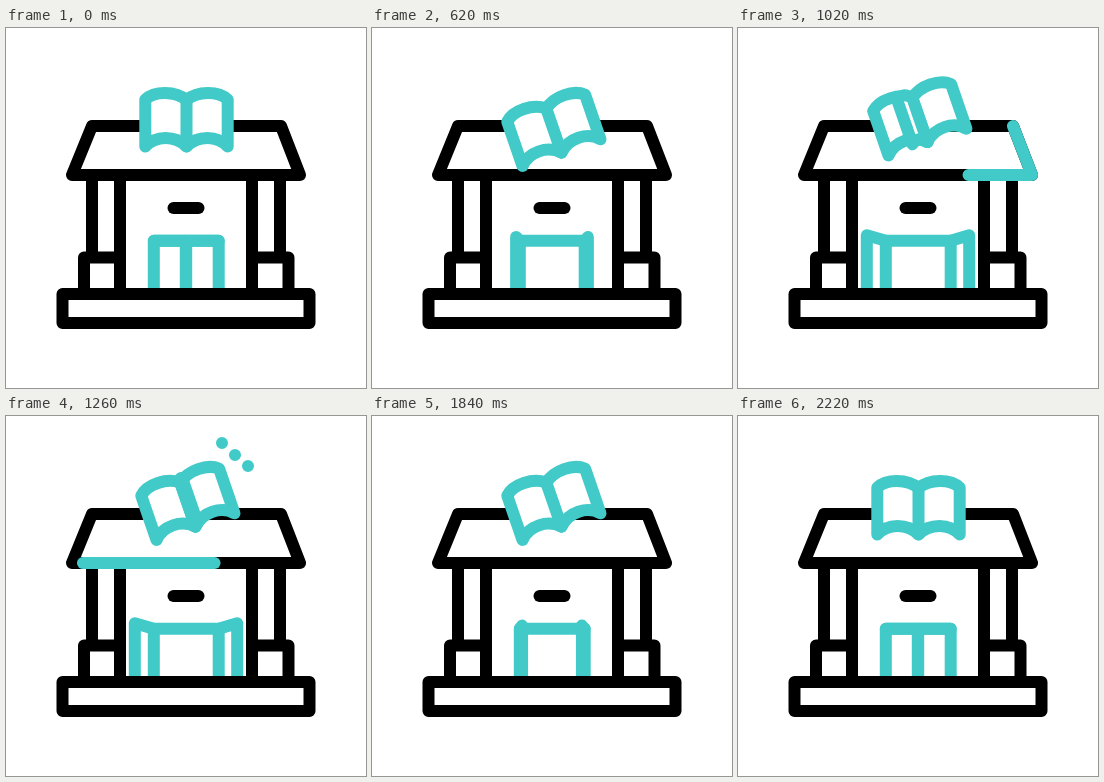
Animation of 360 by 360 pixels, one loop 2400 ms. Source, as an HTML page:

```html
<!DOCTYPE html>
<html>
<head>
<meta charset="utf-8">
<style>
html, body { margin: 0; width: 100%; height: 100%; overflow: hidden; background: #fff; }
svg { display: block; width: 100vw; height: 100vh; }
path { fill: none; stroke: #000; stroke-width: 12; stroke-linecap: round; stroke-linejoin: round; }
.teal { stroke: #41cac8; }
.page { fill: #fff; }
</style>
</head>
<body>
<svg viewBox="0 0 360 360">
  <path class="teal" d="M147.8 266V212.800H212.700V266"/>
  <path class="teal" id="doors"/>
  <path d="M86 147V229M114 147V266M78 266V229.500H114M246 147V266M274 147V229M246 229.500H282.500V266"/>
  <path d="M167.500 180H192.500"/>
  <path d="M56.500 266H303.500V295H56.500Z"/>
  <path d="M86 98H275L294 147H66Z"/>
  <path class="teal" id="glow"/>
  <g id="book">
    <path class="teal page" d="M-41.200 -22.500C-32 -31.300 -11 -31.300 0 -22C11 -31.300 32 -31.300 41.200 -22.500V24.500C31 13 11 13 0 24.500C-11 13 -31 13 -41.200 24.500Z"/>
    <path class="teal" d="M0 -22V24.500"/>
    <path class="teal page" id="leaf"/>
  </g>
  <path class="teal" id="rays"/>
</svg>
<script>
const LOOP = 2400;
const $ = id => document.getElementById(id);
const [doors, glow, book, leaf, rays] = ['doors', 'glow', 'book', 'leaf', 'rays'].map($);

const ramp = (t, a, b) => Math.min(1, Math.max(0, (t - a) / (b - a)));
const ease = (t, a, b) => { const u = ramp(t, a, b); return u * u * (3 - 2 * u); };
const mix = (a, b, u) => a + (b - a) * u;
const point = (x, y) => x.toFixed(2) + ' ' + y.toFixed(2);

const ROOF = [[86, 98], [275, 98], [294, 147], [66, 147]];
const SIDES = ROOF.map((p, i) => {
  const q = ROOF[(i + 1) % 4];
  return Math.hypot(q[0] - p[0], q[1] - p[1]);
});
const RAYS = [[216, 27, 214, 12.5], [229, 39, 239, 28], [242, 50, 257.5, 48.5]];
const FLIP = { start: 847, time: 280, count: 2 };

// Part of the roof outline between two distances, clockwise from top left
function roofPart(from, to) {
  const pts = [];
  let start = 0;
  for (let i = 0; start < to; i++) {
    const len = SIDES[i % 4], p = ROOF[i % 4], q = ROOF[(i + 1) % 4];
    const a = Math.max(from, start), b = Math.min(to, start + len);
    if (a < b) {
      for (const s of [a, b]) {
        const u = (s - start) / len;
        pts.push(point(mix(p[0], q[0], u), mix(p[1], q[1], u)));
      }
    }
    start += len;
  }
  return pts.length ? 'M' + pts.join('L') : '';
}

function drawDoors(t) {
  const open = ease(t, 200, 860) - ease(t, 1540, 2215);
  const x = mix(179.8, 128.8, open), y = mix(212.8, 207.3, open);
  doors.setAttribute('d',
    `M147.8 212.8L${point(x, y)}V266M212.7 212.8L${point(360 - x, y)}V266`);
}

function leafPath(t) {
  const turn = (t - FLIP.start) / FLIP.time;
  if (turn <= 0 || turn >= FLIP.count) return '';
  const a = Math.PI * (turn % 1);
  const x = 41.2 * Math.cos(a), lift = -3 * Math.sin(a);
  const bow = 12 * Math.abs(Math.cos(a)) + 2;
  return `M0 -22Q${point(x / 2, -22 + lift - bow)} ${point(x, -22.5 + lift)}` +
    `V${(24.5 + lift).toFixed(2)}Q${point(x / 2, 24.5 + lift - bow)} 0 24.5Z`;
}

function drawBook(t) {
  const back = ease(t, 1840, 2215);
  const tilt = ease(t, 200, 600) - back;
  const rise = ease(t, 660, 1190);
  const y = mix(mix(mix(94, 101.5, ease(t, 200, 600)), 87.5, rise), 94, back);
  book.setAttribute('transform',
    `translate(${point(mix(180.5, 181.5, tilt), y)}) rotate(${(-19 * tilt).toFixed(2)})`);
  leaf.setAttribute('d', leafPath(t));
}

function drawGlow(t) {
  const head = Math.min(622, 305 + 0.64 * (t - 1020));
  const tail = Math.max(100, 189 + 0.575 * (t - 1020));
  glow.setAttribute('d', head > tail ? roofPart(tail, head) : '');
}

function drawRays(t) {
  const head = ease(t, 1260, 1560), tail = ease(t, 1510, 1820);
  const on = t >= 1240 && t < 1820;
  rays.setAttribute('d', on ? RAYS.map(([x, y, u, v]) =>
    `M${point(mix(x, u, tail), mix(y, v, tail))}L${point(mix(x, u, head) + 0.01, mix(y, v, head))}`
  ).join('') : '');
}

function draw(t) {
  drawDoors(t);
  drawBook(t);
  drawGlow(t);
  drawRays(t);
}

let origin = null;
function tick(now) {
  if (origin === null) origin = now;
  draw((now - origin) % LOOP);
  requestAnimationFrame(tick);
}
draw(0);
requestAnimationFrame(tick);
</script>
</body>
</html>
```
